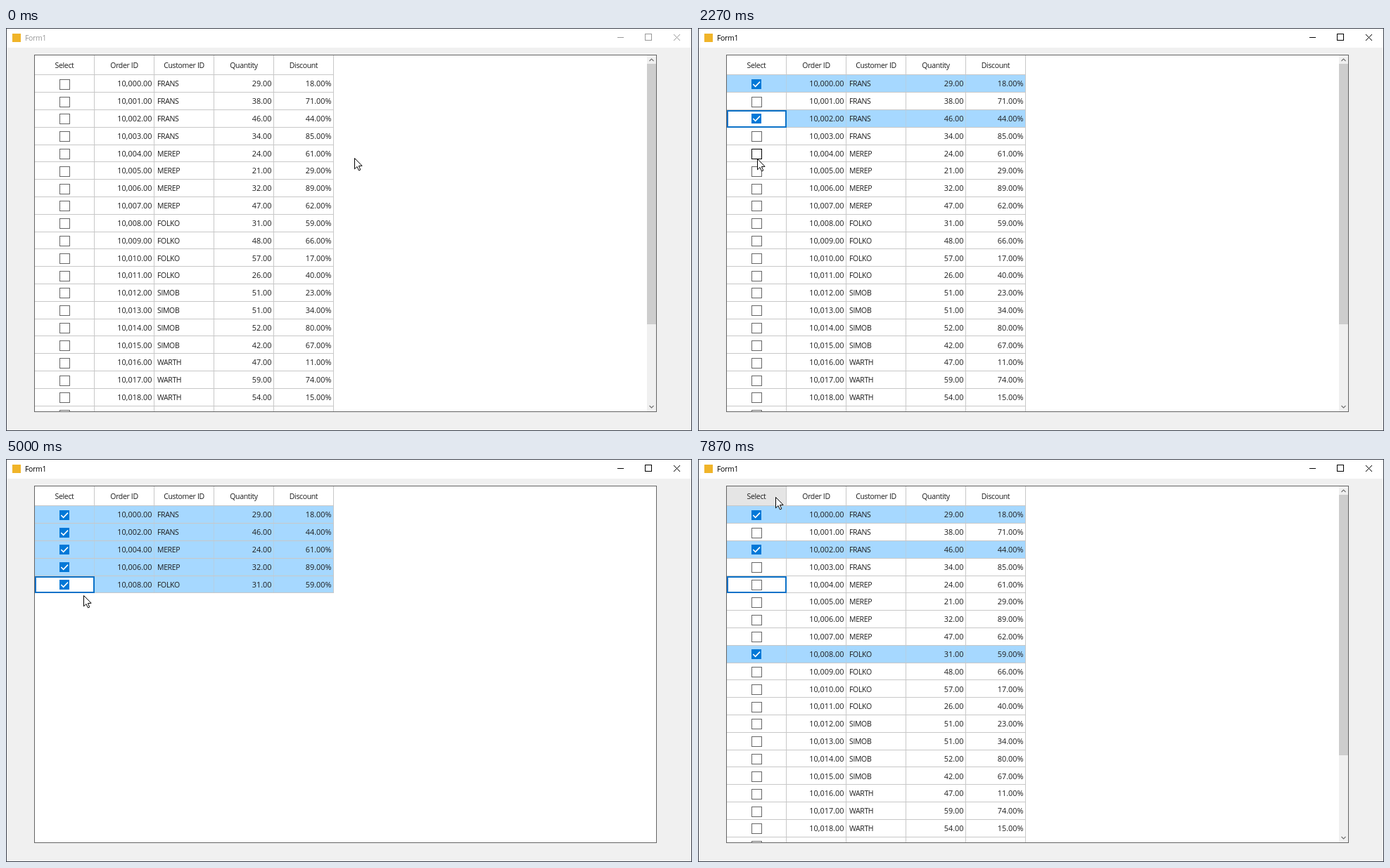
These frames come from a looping animation (975x574 px, 8000 ms). An HTML page with a canvas:

```html
<!DOCTYPE html>
<html lang="en">
<head>
<meta charset="utf-8">
<title>Form1</title>
<style>
html, body { margin: 0; width: 100%; height: 100%; overflow: hidden; background: #f0f0f0; }
canvas { display: block; }
</style>
</head>
<body>
<canvas id="stage" width="975" height="574"></canvas>
<script>
const ctx = document.getElementById('stage').getContext('2d');
const LOOP = 8000, STEP = 200 / 3;
const BLUE = '#0078d7', GRID = '#c8c8c8';
const LEFT = 40, COL = 85, PITCH = 24.815;
const HEADERS = ['Select', 'Order ID', 'Customer ID', 'Quantity', 'Discount'];

// Quantity and discount of each customer's orders
const ORDERS = {
  FRANS: '29 18%, 38 71%, 46 44%, 34 85%',
  MEREP: '24 61%, 21 29%, 32 89%, 47 62%',
  FOLKO: '31 59%, 48 66%, 57 17%, 26 40%',
  SIMOB: '51 23%, 51 34%, 52 80%, 42 67%',
  WARTH: '47 11%, 59 74%, 54 15%, 33 52%'
};
const ROWS = Object.entries(ORDERS)
  .flatMap(([customer, list]) => list.split(', ').map(item => [customer, ...item.split(' ')]))
  .map(([customer, quantity, discount], i) => ({
    id: i,
    order: `10,0${String(i).padStart(2, '0')}.00`,
    customer,
    quantity: quantity + '.00',
    discount: discount.replace('%', '.00%')
  }));

// Pointer stops: it rests on a row, clicks its checkbox and leaves at once.
// HEAD is the header; bow bends the way there downwards.
const HEAD = -1;
const STOPS = [
  { come: 870, leave: 1070, row: 0, bow: 102 },
  { come: 1670, leave: 1670, row: 2, bow: 44 },
  { come: 2270, leave: 2400, row: 4.3 },
  { come: 2930, leave: 3130, row: 6.1 },
  { come: 3470, leave: 3800, row: 7.9 },
  { come: 4330, leave: 4730, row: HEAD },
  { come: 5400, leave: 5600, row: HEAD, bow: 147 },
  { come: 6400, leave: 6730, row: 6 },
  { come: 6870, leave: 7200, row: 3.8 },
  { come: 7870, leave: LOOP, row: HEAD }
];
const ACTIVATE = 930, FILTER_ON = 4470, FILTER_OFF = 5600;

const place = (base, i) => Math.floor(base + PITCH * i);
const lineY = i => place(66.75, i);
const colX = i => LEFT + COL * i;
const ease = k => k < 0.5 ? 4 * k ** 3 : 1 - 4 * (1 - k) ** 3;
const mix = (a, b, k) => a + (b - a) * k;
const spot = row => ({ x: row === HEAD ? 110 : 84, y: lineY(row) + 13 });

function pointer(t) {
  let from = { x: 495, y: 185 }, since = 0;
  for (const { come, leave, row, bow = 0 } of STOPS) {
    const to = spot(row);
    if (t < come) {
      const k = (t - since) / (come - since), e = ease(k);
      return {
        x: Math.round(mix(from.x, to.x, e)),
        y: Math.round(mix(from.y, to.y, e) + bow * Math.sin(Math.PI * k))
      };
    }
    if (t < leave) return to;
    from = to;
    since = leave;
  }
  return from;
}

function box(color, x, y, w, h) {
  ctx.fillStyle = color;
  ctx.fillRect(x, y, w, h);
}

function frame(color, x, y, w, h, width = 1) {
  ctx.strokeStyle = color;
  ctx.lineWidth = width;
  ctx.strokeRect(x + width / 2, y + width / 2, w - width, h - width);
}

function line(color, width, ...pts) {
  ctx.strokeStyle = color;
  ctx.lineWidth = width;
  ctx.beginPath();
  for (let i = 0; i < pts.length; i += 2) ctx.lineTo(pts[i], pts[i + 1]);
  ctx.stroke();
}

function label(str, x, y, align = 'left', color = '#1c1c1c') {
  const words = /[a-z]/i.test(str);
  ctx.font = (words ? '10.5px' : '10.9px') + ' "Open Sans", "Noto Sans", sans-serif';
  ctx.letterSpacing = words ? '-0.35px' : '0px';
  ctx.textAlign = align;
  ctx.fillStyle = color;
  ctx.fillText(str, x, y);
}

function drawWindow(active) {
  const ink = active ? '#000' : '#999';
  box('#f0f0f0', 0, 0, 975, 574);
  box('#fff', 1, 1, 973, 27);
  frame('#3a3f4b', 0, 0, 975, 574);
  box('#f0b429', 9, 8, 12, 12);
  label('Form1', 27, 18, 'left', ink);
  box(ink, 869, 13, 9, 1);
  frame(ink, 908, 8, 10, 10);
  line(ink, 1, 949, 9, 958, 18);
  line(ink, 1, 958, 9, 949, 18);
  box('#fff', LEFT, 38, 885, 509);
}

function drawScrollbar() {
  box('#f0f0f0', 911, 39, 13, 507);
  box('#cdcdcd', 911, 51, 13, 371);
  line('#707070', 1.1, 914.5, 47, 917.5, 44, 920.5, 47);
  line('#707070', 1.1, 914.5, 538, 917.5, 541, 920.5, 538);
}

function drawHeader(hover) {
  if (hover) box('#e5e5e5', 41, 39, 84, 27);
  HEADERS.forEach((name, i) => {
    label(name, colX(i + 0.5) + 0.5, 57, 'center');
    box(GRID, colX(i + 1), 39, 1, 28);
  });
  box(GRID, 41, 66, 425, 1);
}

function drawCheck(y, on, hover) {
  if (!on) {
    box('#fff', 76, y, 15, 15);
    frame(hover ? '#000' : '#666', 76, y, 15, 15);
    return;
  }
  box(BLUE, 76, y, 14, 14);
  line('#fff', 1.6, 78.3, y + 7, 81.6, y + 10.3, 88, y + 3.6);
}

function drawRow(row, slot, on, current, pos) {
  const y = lineY(slot) + 1, end = lineY(slot + 1);
  const top = place(73.2, slot), base = place(83.9, slot);
  if (on) box('#a6d8ff', 41, y, 424, end - y);
  for (let c = 1; c < 6; c++) box(on && c < 5 ? '#b4cfe4' : GRID, colX(c), y, 1, end - y + 1);
  box(GRID, 41, end, 425, 1);
  if (current) {
    box('#fff', 41, y, 85, end - y + 1);
    frame('#0c72c8', 41, y, 85, end - y + 1, 2);
  }
  const hover = pos.x >= 76 && pos.x <= 91 && pos.y >= top && pos.y <= top + 15;
  drawCheck(top, on, hover);
  label(row.order, 207.5, base, 'right');
  label(row.customer, 215, base);
  label(row.quantity, 377.5, base, 'right');
  label(row.discount, 462.5, base, 'right');
}

function drawPointer({ x, y }) {
  ctx.save();
  ctx.translate(x + 0.5, y + 0.5);
  ctx.beginPath();
  [[0, 0], [0, 15.3], [3.5, 12], [6, 17.4], [8.3, 16.4], [5.9, 11.1], [10.6, 10.8]]
    .forEach(p => ctx.lineTo(...p));
  ctx.closePath();
  ctx.fillStyle = '#fff';
  ctx.fill();
  ctx.strokeStyle = '#000';
  ctx.lineWidth = 1;
  ctx.stroke();
  ctx.restore();
}

function draw(t) {
  const pos = pointer(t);
  const checked = new Set();
  let current = -1;
  for (const stop of STOPS) {
    if (t < stop.leave) break;
    if (stop.row === HEAD) continue;
    current = Math.round(stop.row);
    if (!checked.delete(current)) checked.add(current);
  }
  const filtered = t >= FILTER_ON && t < FILTER_OFF;
  const rows = ROWS.filter(row => !filtered || checked.has(row.id));

  drawWindow(t >= ACTIVATE);
  ctx.save();
  ctx.beginPath();
  ctx.rect(41, 39, 883, 507);
  ctx.clip();
  drawHeader(pos.x > 40 && pos.x < 125 && pos.y > 38 && pos.y < 67);
  rows.forEach((row, slot) => drawRow(row, slot, checked.has(row.id), row.id === current, pos));
  if (!filtered) drawScrollbar();
  ctx.restore();
  frame('#646464', LEFT, 38, 885, 509);
  drawPointer(pos);
}

// The screen refreshes 15 times a second, on times rounded to 10 ms.
const start = performance.now();
function tick() {
  const t = (performance.now() - start) % LOOP;
  const step = Math.floor((t + 4) / STEP) % 120;
  draw(Math.round(step * STEP / 10) * 10);
  requestAnimationFrame(tick);
}
tick();
</script>
</body>
</html>
```
